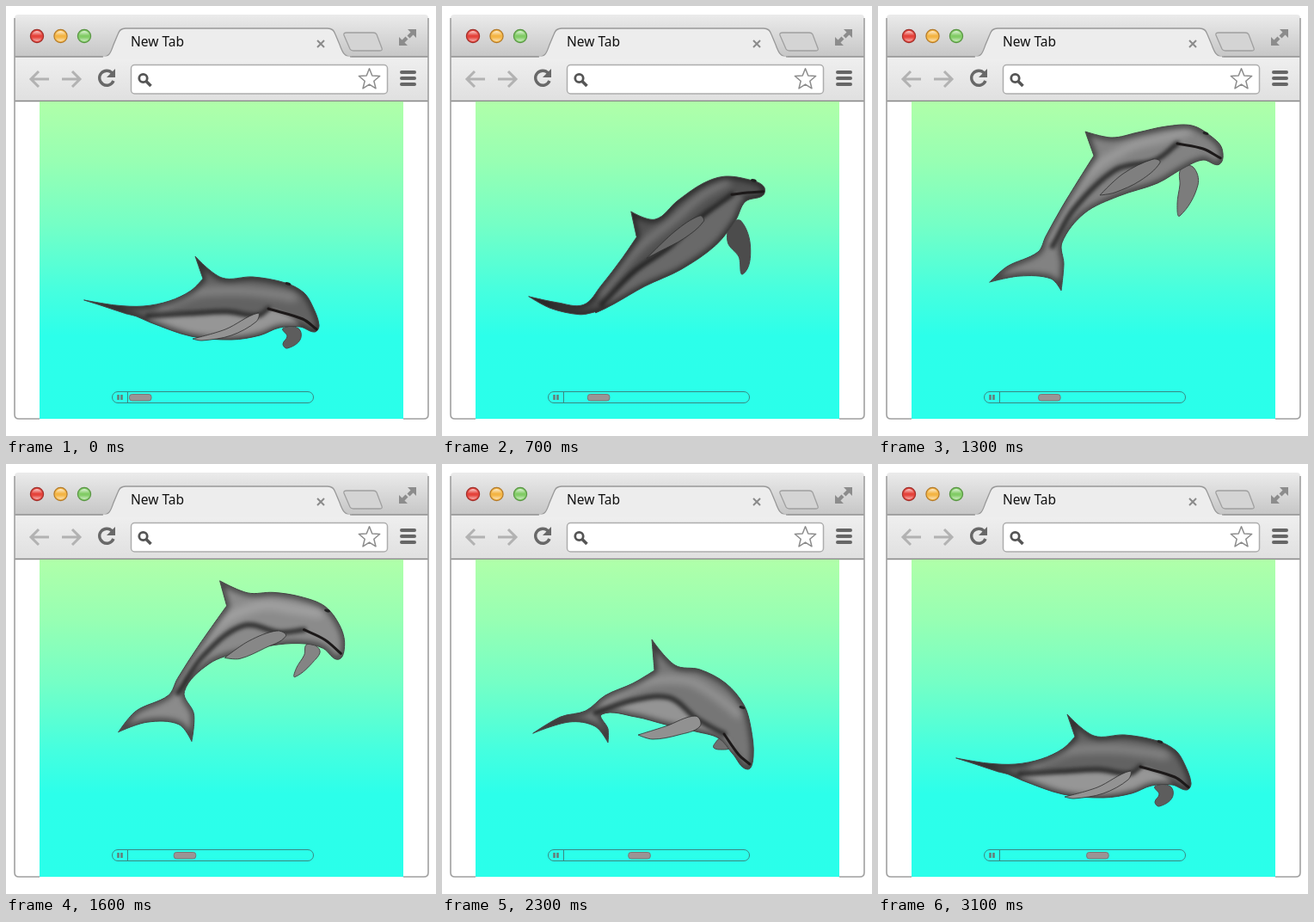
An HTML page with a canvas for the animation above (3.2 s loop, 500 by 500 pixels).

```html
<!DOCTYPE html>
<html lang="en">
<head>
<meta charset="utf-8">
<title>Dolphin</title>
<style>
  html, body { margin: 0; width: 100%; height: 100%; overflow: hidden; background: #fff; }
  svg, canvas { position: absolute; left: 0; top: 0; width: 500px; height: 500px; }
  text { font: 15.5px "Noto Sans", "Open Sans", sans-serif; }
</style>
</head>
<body>
<svg viewBox="0 0 500 500" fill="none">
  <defs>
    <linearGradient id="strip" x2="0" y2="1"><stop stop-color="#ebebeb"/><stop offset="1" stop-color="#c6c6c6"/></linearGradient>
    <linearGradient id="bar" x2="0" y2="1"><stop stop-color="#efefef"/><stop offset="1" stop-color="#e0e0e0"/></linearGradient>
    <linearGradient id="sea" x2="0" y2="1">
      <stop stop-color="#b0ffa9"/><stop offset=".19" stop-color="#97ffb3"/><stop offset=".39" stop-color="#74ffc6"/>
      <stop offset=".6" stop-color="#45ffdf"/><stop offset=".74" stop-color="#2cffea"/><stop offset="1" stop-color="#2affea"/>
    </linearGradient>
    <linearGradient id="gloss" x2="0" y2="1">
      <stop stop-color="#fff" stop-opacity=".75"/><stop offset=".45" stop-color="#fff" stop-opacity="0"/>
      <stop offset=".6" stop-color="#fff" stop-opacity="0"/><stop offset="1" stop-color="#fff" stop-opacity=".6"/>
    </linearGradient>
  </defs>

  <path d="M10 59V14q0-4 4-4H487q4 0 4 4V59z" fill="url(#strip)"/>
  <path d="M10 59H491V110H10z" fill="url(#bar)"/>
  <path d="M10 59H112C121 59 122 53 125 45L130 33Q132 26 139 26H374Q381 26 383 33L388 45C391 53 393 59 401 59H491" fill="#ededed" stroke="#999" stroke-width="1.3"/>
  <path d="M11 58.8H112M402 58.8H490" stroke="#999"/>
  <path d="M113 60H400" stroke="#ededed" stroke-width="3"/>
  <path d="M396 31H427Q430 31 431 33L437 49Q438 52 435 52H404Q401 52 400 50L393 34Q392 31 396 31z" fill="#d4d4d4" stroke="#a0a0a0" stroke-width="1.3"/>
  <path d="M10 110.5H491" stroke="#858585" stroke-width="1.5"/>
  <path d="M10 14V475Q10 480 15 480H39M462 480H486Q491 480 491 475V14" stroke="#a0a0a0" stroke-width="1.6"/>

  <g stroke-width="1.2">
    <circle cx="36" cy="35" r="7.6" fill="#e5433b" stroke="#a0322d"/>
    <circle cx="63.5" cy="35" r="7.6" fill="#f4b544" stroke="#b27a2b"/>
    <circle cx="91" cy="35" r="7.6" fill="#82cc66" stroke="#5a9545"/>
  </g>
  <g fill="url(#gloss)"><circle cx="36" cy="35" r="6"/><circle cx="63.5" cy="35" r="6"/><circle cx="91" cy="35" r="6"/></g>

  <text x="145" y="47" fill="#111">New Tab</text>
  <path d="M362 40l8 8m0-8l-8 8" stroke="#8a8a8a" stroke-width="2"/>
  <g fill="#8c8c8c"><path d="M467 27H477V37L473.500 33.500L469.500 37.500L466.500 34.500L470.500 30.500z"/><path d="M467 46H457V36L460.500 39.500L464.500 35.500L467.500 38.500L463.500 42.500z"/></g>

  <g stroke="#b2b2b2" stroke-width="3"><path d="M50 85H30M38 76L29 85L38 94"/><path d="M65 85H85M77 76L86 85L77 94"/></g>
  <path d="M123.500 78A8.500 8.500 0 1 0 125 87" stroke="#686868" stroke-width="3.400"/>
  <path d="M127 73V83H117z" fill="#686868"/>
  <rect x="145.500" y="68.500" width="298" height="33.500" rx="4" fill="#fff" stroke="#adadad" stroke-width="1.500"/>
  <circle cx="159.500" cy="84" r="4.700" stroke="#555" stroke-width="2.800"/>
  <path d="M163 87.500L168.500 93" stroke="#555" stroke-width="3.600"/>
  <path id="star" fill="#fff" stroke="#8c8c8c" stroke-width="1.500" stroke-linejoin="round"/>
  <path d="M460 77H475M460 84H475M460 91H475" stroke="#666" stroke-width="4" stroke-linecap="round"/>

  <rect x="39" y="111" width="423" height="369" fill="url(#sea)"/>
  <rect x="123.500" y="448.500" width="234" height="13" rx="6.500" stroke="#398781"/>
  <path d="M141.500 449V461" stroke="#398781"/>
  <path d="M130.500 452V458M134.500 452V458" stroke="#667f7d" stroke-width="2.600"/>
  <rect id="thumb" x="143.500" y="451.500" width="25.500" height="7.500" rx="3" fill="#9b9494" stroke="#777"/>
</svg>
<canvas id="stage" width="500" height="500"></canvas>

<script>
const LOOP = 3200, STEP = 100;
const KEYS = [0, 4, 9, 13, 19, 23, 31];
const THUMB = [0, 4, 8, 10, 14, 17, 23], THUMB_STEP = 4.31;

// Body points run from the tail tip along the back, round the beak and back under the belly.
const POSES = [
  { body: [91,342, 128,348, 160,349, 190,343, 215,331, 229,317, 220,291, 251,316, 287,315, 325,322, 346,333, 356,348,
           364,371, 359,379, 342,373, 318,374, 295,383, 262,388, 215,384, 168,368, 152,361, 140,358, 128,354, 110,348],
    near: [293,357, 255,376, 217,387, 228,389, 262,383, 291,367],
    far: [322,375, 340,375, 342,388, 327,398, 322,393, 327,384],
    face: [305,352, 345,364, 328,323], tone: [98, 150] },
  { body: [93,346, 125,355, 160,359, 183,345, 208,321, 223,305, 216,280, 247,293, 275,279, 305,271, 332,270, 353,283,
           368,294, 367,304, 348,307, 332,322, 305,341, 265,354, 222,368, 185,377, 165,377, 150,373, 138,368, 118,358],
    near: [295,310, 265,325, 228,351, 240,347, 270,335, 298,316],
    far: [327,322, 341,318, 347,340, 336,366, 331,352, 323,337],
    face: [333,294, 350,297, 349,278], tone: [82, 116] },
  { body: [109,331, 140,333, 170,332, 188,307, 212,271, 232,238, 225,206, 252,214, 278,192, 308,169, 332,159, 362,159,
           380,167, 379,179, 358,186, 347,208, 325,240, 285,273, 243,294, 208,320, 190,337, 196,342, 176,347, 135,342],
    near: [305,205, 275,225, 245,257, 262,248, 290,232, 310,212],
    far: [342,214, 354,212, 366,245, 357,277, 352,256, 340,238],
    face: [338,178, 360,175, 370,161], tone: [88, 106] },
  { body: [130,321, 150,303, 186,286, 195,268, 215,232, 251,174, 241,146, 272,153, 302,147, 335,140, 365,139, 388,152,
           400,166, 397,184, 378,179, 356,188, 325,206, 280,221, 240,241, 214,275, 216,300, 213,331, 201,317, 165,314],
    near: [320,178, 285,195, 258,220, 275,217, 305,203, 328,182],
    far: [352,190, 366,187, 372,208, 351,244, 348,230, 351,208],
    face: [348,160, 378,166, 381,148], tone: [130, 130] },
  { body: [123,306, 148,281, 184,267, 200,245, 228,213, 256,183, 251,151, 283,174, 312,176, 342,190, 366,212, 378,240,
           379,270, 369,285, 352,267, 335,250, 305,238, 265,242, 232,246, 197,269, 211,293, 211,318, 192,297, 155,294],
    near: [305,230, 275,238, 244,253, 262,257, 290,247, 315,240],
    far: [342,250, 356,264, 342,271, 323,272, 326,265, 336,258],
    face: [340,245, 357,262, 361,212], tone: [134, 142] },
  { body: [106,313, 138,294, 167,287, 190,269, 222,255, 247,240, 244,204, 271,234, 300,239, 330,255, 351,280, 359,306,
           362,340, 355,355, 338,337, 322,319, 295,311, 260,303, 225,294, 186,291, 193,308, 193,324, 178,305, 148,300],
    near: [295,293, 260,305, 228,315, 245,320, 275,315, 300,305],
    far: [325,318, 335,322, 335,330, 326,332, 316,330, 318,324],
    face: [328,314, 345,338, 349,283], tone: [118, 148] }
];
const COUNT = POSES.length;
const BODY_CORNERS = [0, 5, 6, 21];

const ctx = document.getElementById("stage").getContext("2d");
const thumb = document.getElementById("thumb");
const grey = v => `rgb(${v},${v},${v})`;
const mix = (a, b, k) => [a[0] + (b[0] - a[0]) * k, a[1] + (b[1] - a[1]) * k];
const wrap = i => (i + COUNT) % COUNT;
const span = i => KEYS[wrap(i) + 1] - KEYS[wrap(i)];
const segment = f => Math.max(0, KEYS.findLastIndex(k => k <= f && k < 31));

// Cyclic cubic interpolation between poses with uneven spacing.
function blend(part, frame) {
  const i = segment(frame), h = span(i), u = (frame - KEYS[i]) / h;
  const value = (k, n) => POSES[wrap(k)][part][n];
  const slope = (k, n) => {
    const a = span(k - 1), b = span(k);
    return ((value(k, n) - value(k - 1, n)) / a * b + (value(k + 1, n) - value(k, n)) / b * a) / (a + b);
  };
  const w = u * u * (3 - 2 * u);
  return POSES[i][part].map((v, n) => v + (value(i + 1, n) - v) * w
    + h * u * (1 - u) * ((1 - u) * slope(i, n) - u * slope(i + 1, n)));
}

function points(part, frame) {
  const v = blend(part, frame);
  return v.flatMap((x, i) => i % 2 ? [] : [[x, v[i + 1]]]);
}

function smooth(p, closed = true, corners = []) {
  const path = new Path2D(), n = p.length;
  const at = i => closed ? p[(i + n) % n] : p[Math.min(n - 1, Math.max(0, i))];
  const direction = i => {
    if (corners.includes(i % n)) return [0, 0];
    const dx = at(i + 1)[0] - at(i - 1)[0], dy = at(i + 1)[1] - at(i - 1)[1], d = Math.hypot(dx, dy) || 1;
    return [dx / d, dy / d];
  };
  path.moveTo(...p[0]);
  for (let i = 0; i < (closed ? n : n - 1); i++) {
    const a = at(i), b = at(i + 1), s = Math.hypot(b[0] - a[0], b[1] - a[1]) / 3;
    const da = direction(i), db = direction(i + 1);
    path.bezierCurveTo(a[0] + da[0] * s, a[1] + da[1] * s, b[0] - db[0] * s, b[1] - db[1] * s, ...b);
  }
  return path;
}

function fill(path, color, blur = 0) {
  ctx.filter = blur ? `blur(${blur}px)` : "none";
  ctx.fillStyle = color;
  ctx.fill(path);
}

function line(path, color, width, blur = 0) {
  ctx.filter = blur ? `blur(${blur}px)` : "none";
  ctx.strokeStyle = color;
  ctx.lineWidth = width;
  ctx.stroke(path);
}

function drawDolphin(frame) {
  const body = points("body", frame), near = points("near", frame), far = points("far", frame);
  const [corner, lip, brow] = points("face", frame);
  const [back, belly] = blend("tone", frame);
  const outline = smooth(body, true, BODY_CORNERS);
  const flank = [mix(body[2], body[19], .6), mix(body[4], body[18], .5), mix(body[7], body[17], .55),
                 mix(near[0], near[5], .3), corner];
  const shine = [mix(body[3], flank[0], .4), mix(body[5], flank[1], .4), mix(body[8], flank[2], .4),
                 mix(body[9], flank[3], .35), mix(body[10], corner, .3)];

  ctx.clearRect(0, 0, 500, 500);
  ctx.lineCap = ctx.lineJoin = "round";

  const farFin = smooth(far);
  fill(farFin, grey(back * .95));
  line(farFin, "#484848", 1);

  fill(outline, grey(back));
  ctx.save();
  ctx.clip(outline);
  fill(smooth([...flank, ...body.slice(14, 20)]), grey(belly), 2);
  line(smooth(shine, false), "rgba(255,255,255,.2)", 11, 4);
  line(outline, "rgba(0,0,0,.5)", 7, 3);
  line(smooth(flank, false), "rgba(20,20,20,.75)", 6, 2);
  ctx.restore();
  line(outline, "#444", 1);

  line(smooth([corner, lip, mix(body[12], body[13], .6)], false), "#1c1919", 3, .4);
  ctx.filter = "none";
  ctx.fillStyle = "#222";
  ctx.beginPath();
  ctx.ellipse(...brow, 3.5, 1.7, .3, 0, Math.PI * 2);
  ctx.fill();

  const nearFin = smooth(near, true, [2]);
  fill(nearFin, grey(belly * .98));
  line(nearFin, "rgba(45,45,45,.8)", 1);
}

function drawStar() {
  const p = Array.from({ length: 10 }, (_, i) => {
    const a = Math.PI * (i / 5 - .5), r = i % 2 ? 5.6 : 12.8;
    return `${422.5 + r * Math.cos(a)},${85.5 + r * Math.sin(a)}`;
  });
  document.getElementById("star").setAttribute("d", `M${p.join("L")}z`);
}

let shown = -1;
const start = performance.now();

function tick() {
  const frame = Math.floor((performance.now() - start) % LOOP / STEP);
  if (frame !== shown) {
    shown = frame;
    const i = segment(frame), u = (frame - KEYS[i]) / span(i);
    const notch = Math.round(THUMB[i] + (THUMB[i + 1] - THUMB[i]) * u);
    thumb.setAttribute("x", 143.5 + notch * THUMB_STEP);
    drawDolphin(frame);
  }
  requestAnimationFrame(tick);
}

drawStar();
tick();
</script>
</body>
</html>
```
